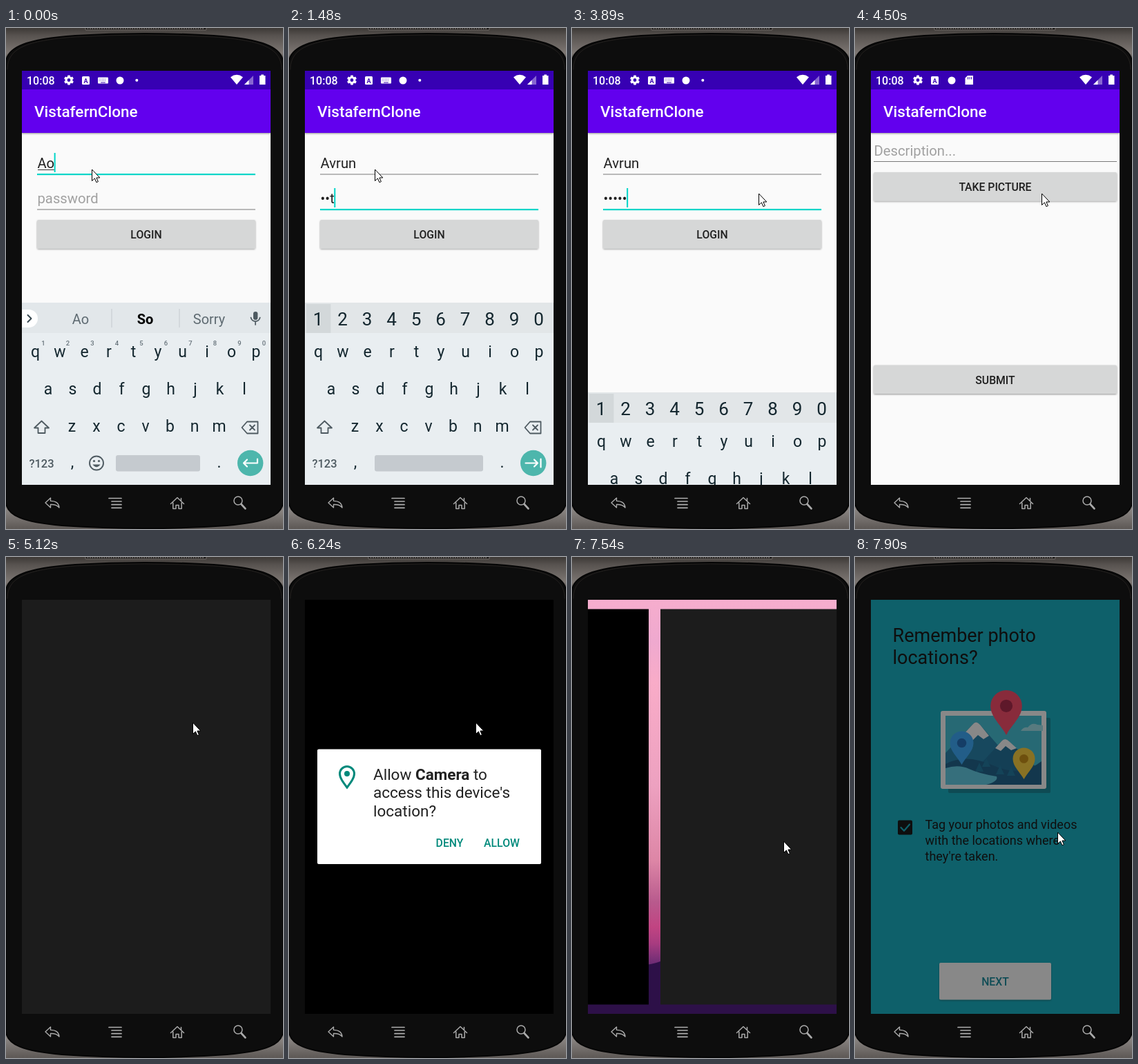
These frames come from a looping animation (401 px wide and 726 px high, 8 s). An HTML page:

```html
<!DOCTYPE html>
<html lang="en">
<head>
<meta charset="utf-8">
<title>Phone login</title>
<style>
html, body { margin: 0; width: 100%; height: 100%; overflow: hidden; background: #0d0d0d; }
svg { display: block; width: 401px; height: 726px; font-family: Roboto, sans-serif; white-space: pre; }
.md { font-weight: 500; }
.mid { text-anchor: middle; }
.line { fill: none; stroke-linecap: round; stroke-linejoin: round; }
</style>
</head>
<body>
<svg id="stage" viewBox="0 0 401 726" xmlns="http://www.w3.org/2000/svg"></svg>
<script>
const LOOP = 8000;
const TITLE = 'VistafernClone';
const NAME = 'Avrun';
const CX = 203;

// Moments at which the screen is refreshed
const STEPS = [0, 120, 240, 490, 610, 730, 850, 970, 1360, 1480, 1600, 1720,
  2120, 2240, 2360, 2480, 2600, 2720, 2840, 2960, 3100, 3220, 3360, 3510,
  3890, 4010, 4130, 4260, 4380, 4500, 4640, 4760, 4880, 5000, 5120, 5870,
  6120, 6240, 6510, 6630, 6760, 6880, 7020, 7160, 7300, 7420, 7540, 7660, 7780, 7900];

// Pointer path: time, x, y
const POINTER = [[0, 124, 205], [2000, 124, 205], [2360, -6, 452], [2480, 40, 420],
  [2840, 245, 275], [3100, 245, 274], [3220, 248, 272], [3360, 249, 273], [3510, 258, 254],
  [3890, 270, 240], [6390, 270, 240], [6510, 286, 262], [6630, 334, 330], [6760, 322, 376],
  [6880, 307, 401], [7020, 303, 412], [7160, 302, 412], [7300, 306, 412], [7660, 306, 412], [7900, 293, 399]];

const rect = (x, y, w, h, fill, more = '') =>
  `<rect x="${x}" y="${y}" width="${w}" height="${h}" fill="${fill}" ${more}/>`;
const text = (x, y, size, fill, str, more = '') =>
  `<text x="${x}" y="${y}" font-size="${size}" fill="${fill}" ${more}>${str}</text>`;
const circle = (x, y, r, fill, more = '') => `<circle cx="${x}" cy="${y}" r="${r}" fill="${fill}" ${more}/>`;
const path = (d, fill, more = '') => `<path d="${d}" fill="${fill}" ${more}/>`;
const line = (d, color, w, more = '') =>
  `<path class="line" d="${d}" stroke="${color}" stroke-width="${w}" ${more}/>`;
const group = (id, body, more = '') => `<g id="${id}" ${more}>${body}</g>`;
const at = (x, y, body) => `<g transform="translate(${x} ${y})">${body}</g>`;

function button(id, x, y, w, label) {
  return rect(x, y, w, 41.5, '#d6d7d7', `id="${id}" rx="2" filter="url(#lift)"`) +
    text(CX, y + 27, 15.75, '#1f1f1f', label, 'class="md mid"');
}

function phone() {
  const slit = rect(115, -2, 175, 5, '#1b1918', 'rx="1" stroke="#77716d"') +
    line('M118 .8H288', '#8b8581', 1.2, 'stroke-dasharray="1 2.4"');
  const body = 'M0 48C3 28 28 16 100 11Q200 5 301 11C373 16 398 28 401 48V688' +
    'C399 706 378 716 320 721Q200 729 81 721C23 716 2 706 0 688Z';
  const nav = at(67, 688, path('M-10 0L-2.5-7V-2.6C6-2.6 9.5 1 10 7C7 3 3 2.3-2.5 2.5V7Z', 'none',
      'stroke="#aaa" stroke-width="1.4" stroke-linejoin="round"')) +
    line('M149 681.5H167M153 686H167M153 690.7H167M153 695.3H167', '#b0b0b0', 1.7) +
    line('M238.5 689.5L248 680.5L257.5 689.5M241.8 688V696.5H246V691.5H250V696.5H254.2V688M253.5 685V681.5', '#aaa', 1.5) +
    circle(336, 685, 6, 'none', 'stroke="#aaa" stroke-width="1.5"') + line('M340.5 690L346.5 696.5', '#aaa', 2.6);
  return rect(0, 0, 401, 363, 'url(#metalTop)') + rect(0, 363, 401, 363, 'url(#metalLow)') + slit +
    path(body, '#0d0d0d', 'stroke="#050505" stroke-width="2"') +
    line('M2 60C2 30 28 18 100 13Q200 7 301 13C373 18 399 30 399 60', '#24211f', 1) + nav;
}

function gear() {
  let teeth = '';
  for (let i = 0; i < 6; i++) teeth += rect(-1.9, -7, 3.8, 4, '#fff', `rx=".8" transform="rotate(${i * 60})"`);
  return teeth + circle(0, 0, 3.9, 'none', 'stroke="#fff" stroke-width="3"');
}

function header(extra) {
  return rect(23, 62, 360, 600, '#fafafa') +
    rect(23, 89, 360, 63, '#6200ee', 'filter="url(#lift)"') + rect(23, 62, 360, 27, '#3700b3') +
    text(30, 81.6, 16, '#fff', '10:08', 'class="md"') + at(91, 75.5, gear()) +
    rect(110, 70, 11, 12, '#fff', 'rx="1.5"') + text(115.5, 79.5, 9, '#3700b3', 'A', 'class="mid" font-weight="700"') +
    extra +
    path('M325 71.2Q334 64.5 343 71.2L334 82Z', '#fff') +
    path('M358 69V82H345Z', '#fff', 'opacity=".4"') + path('M351.5 75.5V82H345Z', '#fff') +
    path('M367 69H369.3V67.5H373V69H375.5V82H367Z', '#fff') +
    text(41, 128.6, 22.5, '#fff', TITLE, 'class="md"');
}

function keys(word, x, y, size = 23) {
  return [...word].map((c, i) => text(x + i * 35.5, y, size, '#14272f', c, 'class="mid"')).join('');
}

function keyboard() {
  const ink = '#4e5a61';
  const hints = [...'1234567890'].map((c, i) =>
    text(54 + i * 35.5, 460, 9.5, '#66727a', c, 'class="mid md"')).join('');
  const strip = path('M23 408H33A13 13 0 0 1 33 434H23Z', '#fff') +
    line('M31.5 416L36.5 421L31.5 426', '#37474f', 2) +
    rect(152.5, 407, 1, 27, '#c3c9cd') + rect(250.5, 407, 1, 27, '#c3c9cd') +
    text(108, 429, 20, '#5f6b72', '', 'id="sug0" class="mid"') +
    text(201.5, 429, 20, '#000', '', 'id="sug1" class="mid" font-weight="700"') +
    text(294, 429, 20, '#5f6b72', '', 'id="sug2" class="mid"') +
    rect(358, 411, 6.4, 12, ink, 'rx="3.2"') + line('M354.5 419.5A6.7 6.7 0 0 0 367.7 419.5M361.1 426V430', ink, 1.7);
  const words = strip + hints + rect(159, 619, 122, 23.5, '#c5cacf', 'rx="3"') +
    circle(131, 630.5, 10, 'none', `stroke="${ink}" stroke-width="1.9"`) +
    circle(127.5, 627.5, 1.6, ink) + circle(134.5, 627.5, 1.6, ink) + path('M125.5 632.5H136.5Q131 640 125.5 632.5Z', ink);
  const digits = rect(23, 398, 360, 44, '#e2e6e8') + rect(25, 400, 35.5, 42, '#d3d8da') +
    keys('1234567890', 42, 430.5, 26) + rect(124, 619, 157, 23.5, '#c5cacf', 'rx="3"');
  return rect(23, 398, 360, 264, '#e9eef1') + rect(23, 398, 360, 44, '#e2e7ea') +
    group('words', words) + group('digits', digits) +
    keys('qwertyuiop', 42.5, 477) + keys('asdfghjkl', 61, 531) + keys('zxcvbnm', 95.5, 585) +
    line('M51.5 569.5L41 579.5H46.5V587H56.5V579.5H62Z', ink, 1.8) +
    line('M341.5 579L349 570.5H364.5V587.5H349ZM353 575.5L360 582.5M360 575.5L353 582.5', ink, 1.8) +
    text(51.5, 636.5, 16.5, ink, '?123', 'class="mid md"') +
    text(96, 637, 23, '#14272f', ',', 'class="mid"') + text(308.5, 637, 23, '#14272f', '.', 'class="mid"') +
    circle(353.7, 630.5, 18.7, '#4db6ac') +
    line('M364 624.5V630.5H344M349 625.5L344 630.5L349 635.5', '#fff', 2.2, 'id="enter"') +
    line('M342.5 630.5H360M355 625.5L360 630.5L355 635.5M364.5 624.5V636.5', '#fff', 2.2, 'id="next"');
}

function login() {
  const icons = rect(133, 71.5, 15, 9, '#fff', 'rx="1"') +
    line('M135 74H146M135 76.3H146', '#3700b3', 1, 'stroke-dasharray="0 2.2"') + line('M137.5 79H143.5', '#3700b3', 1) +
    circle(165, 76, 5.5, '#fff') + circle(189.3, 75.7, 2, '#fff');
  return header(icons) +
    text(45.5, 203, 20.25, '#212121', '', 'id="user"') + rect(46, 205, 25, 1, '#333', 'id="compose"') +
    rect(45, 211, 316, 2, '#00d5c8', 'id="rule0"') +
    text(45.5, 254, 20.25, '#a1a1a1', 'password', 'id="pass"') + rect(45, 262.5, 316, 1, '#7a7a7a', 'id="rule1"') +
    rect(0, 181, 2, 28, '#00d5c8', 'id="caret"') +
    button('loginBtn', 45, 278, 316, 'LOGIN') + group('board', keyboard());
}

function post() {
  const icons = circle(140, 76, 5.5, '#fff') + path('M163 69H171V82H159.5V72.5Z', '#fff') +
    line('M163.5 71.5V74M166 71.5V74M168.5 71.5V74', '#3700b3', 1);
  return header(icons) + text(27.5, 185, 20.25, '#a1a1a1', 'Description...') +
    rect(27, 193, 352, 1, '#7a7a7a') +
    button('takeBtn', 27, 209, 352, 'TAKE PICTURE') + button('sendBtn', 27, 488.5, 352, 'SUBMIT');
}

function dialog() {
  const teal = '#00897b', ink = '#212121';
  return rect(41, 278.5, 324, 166.5, '#fff', 'rx="2"') +
    path('M84 334C78 326 73.5 320 73.5 314A10.5 10.5 0 0 1 94.5 314C94.5 320 90 326 84 334Z', 'none',
      `stroke="${teal}" stroke-width="3"`) + circle(84, 314, 4, teal) +
    text(122, 323, 22.5, ink, 'Allow <tspan font-weight="700">Camera</tspan> to') +
    text(122, 349.4, 22.5, ink, "access this device's") + text(122, 375.8, 22.5, ink, 'location?') +
    text(232.5, 420, 15.75, teal, 'DENY', 'class="md mid"') + text(308, 420, 15.75, teal, 'ALLOW', 'class="md mid"');
}

function pin(x, tip, r, fill, dark) {
  const top = tip - r * 2.85;
  return at(x, top + r, path(`M0 ${r * 1.85}C${-r * .35} ${r * 1.2} ${-r} ${r * .7} ${-r} 0A${r} ${r} 0 0 1 ${r} 0C${r} ${r * .7} ${r * .35} ${r * 1.2} 0 ${r * 1.85}Z`, fill) +
    circle(0, 0, r * .4, dark));
}

function memo() {
  const ink = '#000';
  const tree = (x, y) => path(`M${x} ${y}l6 13h-12Z`, '#0c6f9c');
  const scene = rect(131, 230, 139, 99, '#35bfd6') +
    path('M240 252q4-6 10-5q6-8 14-4l8 1v8Z', '#9be3ee') +
    path('M131 284L170 243Q175 236 181 243L215 282L224 292V330H131Z', '#1279a8') +
    path('M157 257L170 243Q175 236 181 243L194 259L186 264L178 258L170 266L164 260Z', '#fff') +
    path('M180 302L212 267Q217 261 223 267L270 312V330H180Z', '#0d6796') +
    path('M203 277L212 267Q217 261 223 267L234 277L226 280L218 274L211 281Z', '#fff') +
    path('M131 300Q160 284 200 302T270 296V330H131Z', '#0a5784') +
    path('M131 306Q150 300 165 307T205 318Q208 325 190 330H131Z', '#54cbe6') +
    tree(190, 291) + tree(210, 302) + tree(226, 304) + tree(180, 298);
  return rect(23, 62, 360, 600, '#00acc1') +
    text(54.5, 123, 27, ink, 'Remember photo') + text(54.5, 154.5, 27, ink, 'locations?') +
    rect(135, 233, 148, 109, '#007f92', 'rx="2"') + rect(124, 223, 153, 113, '#fff', 'rx="3"') + scene +
    pin(154.5, 301, 17, '#2ba6ff', '#0f63b8') + pin(244.5, 322, 16, '#ffd02e', '#c98a00') +
    pin(219, 258, 22.8, '#ff3d5e', '#a8143a') +
    rect(62, 381.5, 21, 21, ink, 'rx="2"') + line('M66.5 392L71 396.8L79 387.5', '#00acc1', 2.2) +
    text(101.5, 393.5, 18, ink, 'Tag your photos and videos') + text(101.5, 416.8, 18, ink, 'with the locations where') +
    text(101.5, 440, 18, ink, "they're taken.") +
    rect(122, 588, 162, 53.5, '#fff', 'rx="2" filter="url(#lift)"') +
    text(CX, 621, 15.75, '#008296', 'NEXT', 'class="md mid"');
}

function wallpaper() {
  return rect(23, 62, 360, 600, 'url(#dusk)') +
    path('M23 600Q70 580 100 591Q112 592 128 586L200 560Q290 600 383 570V662H23Z', '#2d1048');
}

const stops = list => list.map(([o, c]) => `<stop offset="${o}" stop-color="${c}"/>`).join('');
const fade = (id, list) => `<linearGradient id="${id}" x2="0" y2="1">${stops(list)}</linearGradient>`;

document.getElementById('stage').innerHTML = `<defs>
  ${fade('metalTop', [[0, '#3d3936'], [.03, '#57524f'], [.1, '#7d7773'], [.16, '#1a1817']])}
  ${fade('metalLow', [[.84, '#2b2826'], [.92, '#8b8683'], [1, '#5d5855']])}
  ${fade('dusk', [[0, '#f6adcd'], [.1, '#efa9cf'], [.2, '#f9acc8'], [.45, '#eda1c0'], [.63, '#dd86a6'],
    [.73, '#b85a8d'], [.79, '#c14482'], [.83, '#a83c80'], [.88, '#6b2c74'], [1, '#3a1557']])}
  <filter id="lift" x="-5%" y="-10%" width="110%" height="130%">
    <feDropShadow dx="0" dy="1.2" stdDeviation="1.1" flood-opacity=".38"/></filter>
  <clipPath id="screen"><rect x="23" y="62" width="360" height="600"/></clipPath>
  <clipPath id="reveal"><rect id="cut" x="23" y="62" width="360" height="700"/></clipPath>
</defs>` + phone() + group('view',
  rect(23, 62, 360, 600, '#000') + group('login', login()) +
  `<g clip-path="url(#reveal)" id="postWrap">${group('post', post())}</g>` +
  rect(23, 62, 360, 600, '#1c1c1c', 'id="dark"') +
  rect(23, 62, 360, 600, '#000', 'id="black"') + group('dialog', dialog()) +
  group('slide', wallpaper() + rect(0, 75.5, 344, 573, '#000', 'id="old"') + rect(0, 75.5, 344, 573, '#1c1c1c', 'id="fresh"')) +
  group('memo', memo()) + rect(23, 62, 360, 600, '#1c1c1c', 'id="veil"'), 'clip-path="url(#screen)"') +
  group('pointer', path('M.5 0V16.5L4.4 12.9L6.9 18.7L9.4 17.6L6.9 12H11.8Z', '#fff', 'stroke="#000" stroke-width="1" stroke-linejoin="round"'));

const el = {};
document.querySelectorAll('[id]').forEach(n => el[n.id] = n);
const set = (id, attrs) => { for (const k in attrs) el[id].setAttribute(k, attrs[k]); };
const show = (id, on) => { el[id].style.display = on ? '' : 'none'; };
const write = (id, str) => { if (el[id].textContent !== str) el[id].textContent = str; };
const clamp = v => Math.max(0, Math.min(1, v));
const ease = v => 1 - (1 - clamp(v)) ** 2;

function pointerAt(t) {
  let i = 0;
  while (i < POINTER.length - 2 && POINTER[i + 1][0] <= t) i++;
  const [t0, x0, y0] = POINTER[i], [t1, x1, y1] = POINTER[i + 1];
  const k = clamp((t - t0) / (t1 - t0));
  return [Math.round(x0 + (x1 - x0) * k), Math.round(y0 + (y1 - y0) * k)];
}

function suggestions(t, user) {
  if (t < 240) return ['Ao', 'So', 'Sorry'];
  if (t < 490) return ['A', 'And', 'Are'];
  return t < 970 ? [user, user, user + 's'] : ['', '', ''];
}

function drawLogin(t) {
  const second = t >= 970, digits = t >= 1360;
  const letters = t < 490 ? 1 : Math.min(5, 2 + Math.floor((t - 490) / 120));
  const user = t < 120 ? 'Ao' : NAME.slice(0, letters);
  const count = digits ? Math.min(5, 2 + Math.floor((t - 1360) / 120)) : 0;
  const last = t < 3220 ? 'pltrn'[count - 1] : '•';
  const typed = count ? '•'.repeat(count - 1) + last : '';

  write('user', user);
  write('pass', typed || 'password');
  set('pass', { fill: typed ? '#212121' : '#a1a1a1' });
  const userW = el.user.getComputedTextLength();
  const caretX = second ? (typed ? el.pass.getComputedTextLength() : 0) : userW;
  set('caret', { x: 45 + caretX, y: second ? 232 : 181 });
  set('compose', { width: userW });
  show('compose', !second);
  [!second, second].forEach((on, i) => set('rule' + i, {
    y: (i ? 262 : 211) + (on ? 0 : .5), height: on ? 2.2 : 1, fill: on ? '#00d5c8' : '#7a7a7a'
  }));
  suggestions(t, user).forEach((s, i) => write('sug' + i, s));
  ['words', 'enter'].forEach(id => show(id, !digits));
  ['digits', 'next'].forEach(id => show(id, digits));
  set('loginBtn', { fill: t >= 2840 && t < 3100 ? '#c6c8c8' : '#d6d7d7' });
  set('board', { transform: `translate(0 ${t < 3890 ? 0 : t < 4010 ? 130 : 270})` });
}

// A new window rises a little while it is uncovered from below
function rise(k, id, cut) {
  set(id, { transform: `translate(0 ${(1 - k) * 25})` });
  set(cut, { y: 62 + (1 - k) * 575 });
}

function render(time) {
  const t = STEPS.filter(s => s <= time).pop();
  show('login', t < 4500);
  if (t < 4500) drawLogin(t);

  show('postWrap', t >= 4130 && t < 5120);
  rise(ease((t - 4010) / 490), 'post', 'cut');
  set('takeBtn', { fill: t >= 4640 ? '#bfc1c1' : '#d6d7d7' });

  const open = ease((t - 4760) / 360);
  show('dark', t >= 4880 && t < 5870);
  set('dark', { y: 62 + (1 - open) * 600 });

  show('black', t >= 5870 && t < 7420);
  show('dialog', t >= 6120 && t < 7300);
  set('dialog', { opacity: t < 6240 ? .5 : 1 });

  const edge = t < 7540 ? 317 : t < 7660 ? 128 : 31;
  show('slide', t >= 7420 && t < 7780);
  set('old', { x: edge - 17 - 344 });
  set('fresh', { x: edge });

  show('memo', t >= 7780);
  show('veil', t >= 7780);
  set('veil', { opacity: t < 7900 ? .88 : .52 });

  set('pointer', { transform: `translate(${pointerAt(t).join(' ')})` });
}

const start = performance.now();
function tick() {
  render((performance.now() - start) % LOOP);
  requestAnimationFrame(tick);
}
tick();
</script>
</body>
</html>
```
